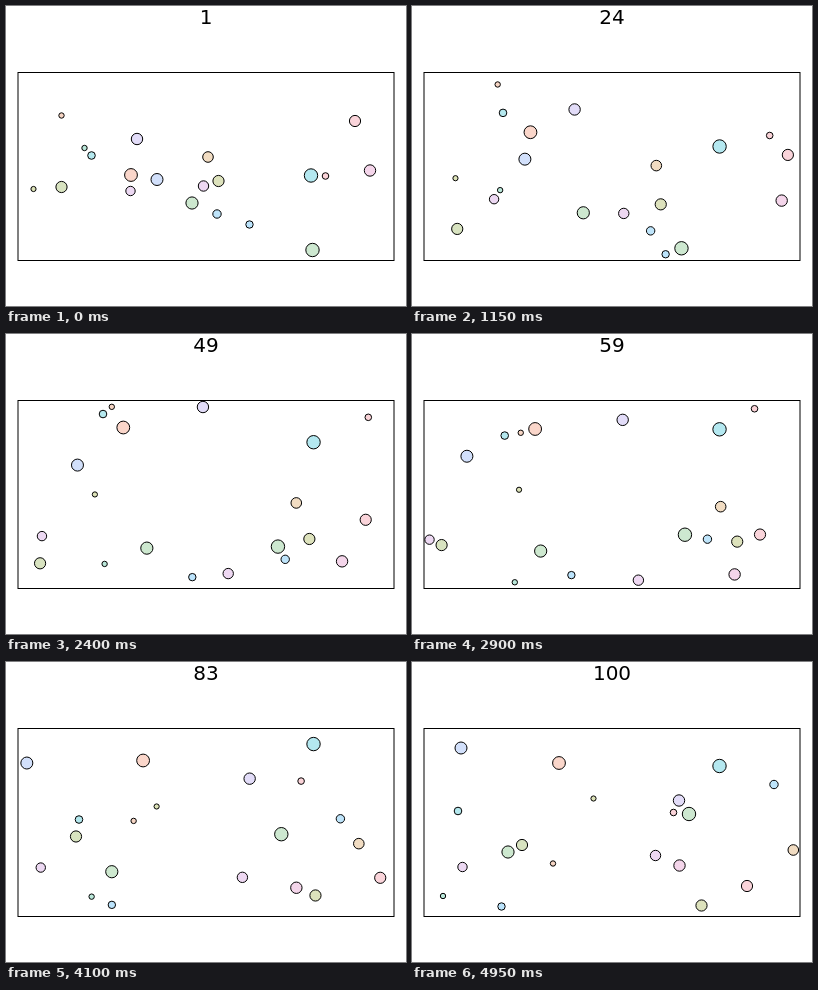
These frames come from a looping animation (400 by 300 pixels, 5000 ms). An HTML page:

```html
<!DOCTYPE html>
<html lang="en">
<head>
<meta charset="utf-8">
<title>Bouncing balls</title>
<style>
  html, body { margin: 0; width: 100%; height: 100%; overflow: hidden; background: #fff; }
  svg { display: block; width: 400px; height: 300px; }
  text { font: 20px "DejaVu Sans", sans-serif; text-anchor: middle; }
  rect, circle { stroke: #000; stroke-width: 1; }
</style>
</head>
<body>
<svg viewBox="0 0 400 300">
  <text id="count" x="200" y="18">1</text>
  <rect x="12" y="66.5" width="376" height="188" fill="none"/>
  <g id="balls"></g>
</svg>
<script>
const STEP = 50, STEPS = 100;
const box = { left: 12, right: 388, top: 66.5, bottom: 254.5 };
const count = document.getElementById('count');
const group = document.getElementById('balls');
const balls = [];

// Each path lists [step, x, y] where the velocity changes by a collision.
// Walls are left out of the paths: fold() mirrors positions back inside.
function ball(fill, r, ...path) {
  const el = document.createElementNS('http://www.w3.org/2000/svg', 'circle');
  el.setAttribute('r', r);
  el.setAttribute('fill', fill);
  group.append(el);
  balls.push({ el, r, path });
}

const fold = (v, lo, hi) => v < lo ? 2 * lo - v : v > hi ? 2 * hi - v : v;

function place({ el, r, path }, step) {
  let i = 1;
  while (i < path.length - 1 && path[i][0] < step) i++;
  const [s0, x0, y0] = path[i - 1];
  const [s1, x1, y1] = path[i];
  const p = (step - s0) / (s1 - s0);
  const x = fold(x0 + (x1 - x0) * p, box.left + r, box.right - r);
  const y = fold(y0 + (y1 - y0) * p, box.top + r, box.bottom - r);
  el.setAttribute('cx', x.toFixed(2));
  el.setAttribute('cy', y.toFixed(2));
}

// untouched balls
ball('#e2dcf8', 5.7, [0, 131, 133], [99, 267, 5.9]);
ball('#d2e0fb', 6, [0, 151, 173.5], [99, -13, 86]);
ball('#dde3b8', 2.6, [0, 27.5, 183], [99, -152.3, 136.5]);
ball('#f1dcc2', 5.3, [0, 202, 151], [99, 384.1, 188]);
ball('#f4d5ea', 5.7, [0, 364, 164.5], [99, 497.1, 294.1]);

// one collision
ball('#fad6ca', 6.4, [0, 125, 169], [41.15, 113.3, 92.5], [99, 147, 101]);
ball('#ecd8f2', 4.7, [0, 124.5, 185], [59.8, 14.2, 206.3], [99, 50.5, 205]);
ball('#eed8f2', 5.2, [0, 197.5, 180], [3.2, 203.5, 182], [99, 243.5, 305.1]);
ball('#b4e8f0', 6.7, [0, 305, 169.5], [2, 307.6, 167.6], [99, 307.5, 42.4]);
ball('#fad3d8', 3.3, [0, 319.5, 170], [2, 316.2, 168.3], [99, 507.9, -10.9]);
ball('#fad4da', 5.6, [0, 349, 115], [61.7, 421.1, 206], [99, 335, 224]);
ball('#cde8d0', 6.7, [0, 306.5, 244], [20.3, 269.2, 250.1], [99, 277, 343.6]);

// several collisions
ball('#f6d5c4', 2.7, [0, 55.5, 109.5], [41.15, 109.5, 54], [51.7, 103.8, 83], [99, 141, 201.5]);
ball('#bae8da', 2.7, [0, 78.5, 142], [72.1, 108.7, 274.1], [75.6, 106.2, 268.7], [99, 31, 269.6]);
ball('#b4e8ee', 3.8, [0, 85.5, 149.5], [51.7, 97.9, 53.7], [84.05, 71.3, -21.7], [99, 46, -8.4]);
ball('#d8e3c0', 5.6, [0, 55.5, 181], [59.8, 28.8, 290], [84.05, 73.8, 326.4], [99, 110, 314.8]);
ball('#dde2bc', 5.6, [0, 212.5, 175], [3.2, 213.7, 180.9], [13, 226.9, 195.7],
  [61.7, 333.3, 208.6], [99, 289.5, 254.3]);
ball('#cde8cf', 6.1, [0, 186, 197], [4.6, 193.7, 201.4], [72.1, 111.5, 221.2], [99, 96, 190]);
ball('#bee4fa', 4.2, [0, 211, 208], [4.6, 203, 204.9], [13, 222.4, 204.7], [99, 362, 378.1]);
ball('#bce4fc', 3.7, [0, 243.5, 218.5], [20.3, 260.9, 252.8], [75.6, 112, 264.1], [99, 89.5, 244.5]);

function draw(step) {
  count.textContent = step + 1;
  for (const b of balls) place(b, step);
}

let shown = 0;
const start = performance.now();

function tick() {
  const step = Math.floor((performance.now() - start) / STEP) % STEPS;
  if (step !== shown) draw(shown = step);
  requestAnimationFrame(tick);
}

draw(0);
tick();
</script>
</body>
</html>
```
